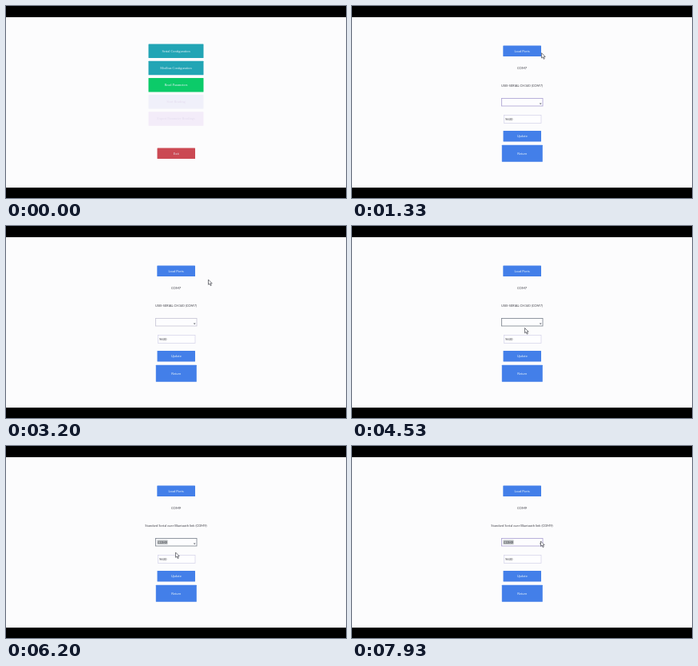
Animation of 426x240 px, one loop 8 s. Source, as an HTML page:

```html
<!DOCTYPE html>
<html lang="en">
<head>
<meta charset="utf-8">
<style>
  html, body { margin: 0; width: 100%; height: 100%; overflow: hidden; background: #000; }
  svg { display: block; width: 100%; height: 100%; }
  text { font: 4.1px Lato, sans-serif; text-anchor: middle; fill: #44444c; }
  .menu text { font: 4.3px "Liberation Serif", serif; }
  .menu text, .settings .button { fill: #e6f2f8; }
  .menu .ghost { fill: #e3dcee; }
  .left { text-anchor: start; }
</style>
</head>
<body>
<svg viewBox="0 0 426 240">
  <rect y="14" width="426" height="213" fill="#fcfcfd"/>
  <g id="menu" class="menu"></g>
  <g id="settings" class="settings">
    <text id="port" x="213" y="79.2">COM7</text>
    <text id="device" x="213" y="100.8"></text>
    <rect x="187.5" y="115.5" width="51.5" height="9.5" fill="#fdfdff" id="combo" stroke-width=".8"/>
    <rect id="selection" x="189.5" y="117.5" width="13" height="5.5" fill="#b7bbbd"/>
    <text id="choice" class="left" x="190" y="121.8">COM9</text>
    <path d="M234.8 121.4h2.8l-1.4 1.9z" fill="#666b73"/>
    <rect x="190.5" y="136.5" width="46.5" height="10" fill="#fefeff" stroke="#d3d2e8" stroke-width=".7"/>
    <text class="left" x="192" y="143">9600</text>
  </g>
  <path id="cursor" d="M0 0V6.3L1.5 5 2.7 7.6 3.8 7.1 2.7 4.7H4.7Z" fill="#fff" stroke="#44464e" stroke-width=".7"/>
</svg>
<script>
const $ = id => document.getElementById(id);
const LOOP = 8000, OPEN_AT = 1250, SELECT_AT = 5450;

function addButton(parent, x, y, w, h, fill, label, kind = "button") {
  const make = (tag, attrs) => {
    const node = document.createElementNS("http://www.w3.org/2000/svg", tag);
    for (const key in attrs) node.setAttribute(key, attrs[key]);
    return parent.appendChild(node);
  };
  make("rect", { x, y, width: w, height: h, fill, rx: .5 });
  make("text", { x: x + w / 2, y: y + h / 2 + 1.3, class: kind }).textContent = label;
}

[
  ["#22a5b5", "Serial Configuration"],
  ["#22a5b5", "Modbus Configuration"],
  ["#0ccb69", "Read Parameters"],
  ["#f0f0fa", "Start Reading", "ghost"],
  ["#f3ecf9", "Export Parameter Readings", "ghost"]
].forEach(([fill, label, kind], i) =>
  addButton($("menu"), 178.5, 47.5 + i * 21.2, 69, 17.5, fill, label, kind));
addButton($("menu"), 189.5, 177.5, 47.5, 13.5, "#cb4953", "Exit");

addButton($("settings"), 189.3, 49.5, 47.7, 13.5, "#437fe9", "Load Ports");
addButton($("settings"), 189.5, 156, 47.5, 13.5, "#437fe9", "Update");
addButton($("settings"), 187.8, 173.7, 51, 21, "#437fe9", "Return");

// time, x, y of the pointer tip
const path = [
  [0, 237, 56], [1250, 237, 56], [1800, 246, 102.5], [2100, 246, 102.5],
  [2900, 253.5, 67], [3450, 253.5, 67], [4250, 216.5, 127.5], [4700, 216.5, 127.5],
  [5050, 236, 120], [5250, 236, 120], [5700, 212.5, 133], [6500, 212.5, 133],
  [7300, 236.5, 119], [8000, 236.5, 119]
];

function pointerAt(t) {
  const i = path.findIndex(p => p[0] > t);
  const [t0, x0, y0] = path[i - 1], [t1, x1, y1] = path[i];
  const u = (t - t0) / (t1 - t0), k = u * u * (3 - 2 * u);
  return [x0 + (x1 - x0) * k, y0 + (y1 - y0) * k];
}

const show = (id, on) => $(id).style.display = on ? "" : "none";

function draw(t) {
  const selected = t >= SELECT_AT;
  show("menu", t < OPEN_AT);
  show("settings", t >= OPEN_AT);
  show("selection", selected);
  show("choice", selected);
  show("cursor", t >= 330);
  $("port").textContent = selected ? "COM9" : "COM7";
  $("device").textContent = selected
    ? "Standard Serial over Bluetooth link (COM9)" : "USB-SERIAL CH340 (COM7)";
  const hovered = t < 2500 || t > 7200;
  $("combo").setAttribute("stroke", hovered ? "#aaa0d2" : t < 4100 ? "#c5c4d4" : "#787f8b");
  $("cursor").setAttribute("transform", `translate(${pointerAt(t)})`);
}

const start = performance.now();
function tick() {
  draw((performance.now() - start) % LOOP);
  requestAnimationFrame(tick);
}
tick();
</script>
</body>
</html>
```
